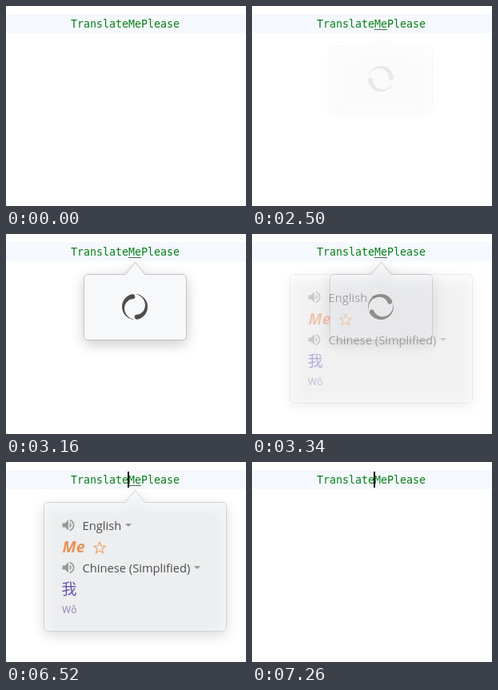
These frames come from a looping animation (300x250 px, 7.76 s). An HTML page with a canvas:

```html
<!DOCTYPE html>
<html lang="en">
<head>
<meta charset="utf-8">
<title>Translation balloon</title>
<style>
  html, body { margin: 0; width: 300px; height: 250px; overflow: hidden; background: #fff; }
  canvas { display: block; width: 300px; height: 250px; }
</style>
</head>
<body>
<canvas id="stage" width="300" height="250"></canvas>
<script>
const LOOP = 7760, STEP = 60;
const ctx = document.getElementById('stage').getContext('2d');

const UI = '"Open Sans", "Noto Sans", sans-serif';
const MONO = '13.29px "DejaVu Sans Mono", monospace';
const GREY = '#6e6e6e';

const CARET_ON = [[500, 1000], [1500, 2000], [6520, 6760], [7260, LOOP]];
const FADE_IN = [0.1, 0.3, 0.55, 0.8, 1];
const SWAP_OUT = [0.95, 0.85, 0.6, 0.3, 0];
const FADE_OUT = [0.68, 0.48, 0.28, 0.1, 0];

const LOADING = { x: 97.5, y: 50.5, w: 128, h: 82 };
const RESULT = { x: 47.5, y: 50.5, w: 228, h: 161 };

const SPEAKER = new Path2D(
  'M3 9v6h4l5 5V4L7 9H3z' +
  'm13.5 3c0-1.77-1.02-3.29-2.5-4.03v8.05c1.48-.73 2.5-2.25 2.5-4.02z' +
  'M14 3.23v2.06c2.89.86 5 3.54 5 6.71s-2.11 5.85-5 6.71v2.06' +
  'c4.01-.91 7-4.49 7-8.77s-2.99-7.86-7-8.77z');

const within = (t, [from, to]) => t >= from && t < to;

function level(t, start, steps) {
  const i = Math.floor((t - start) / STEP);
  return steps[Math.min(i, steps.length - 1)];
}

function text(str, x, y, font, color) {
  ctx.font = font;
  ctx.fillStyle = color;
  ctx.fillText(str, x, y);
}

// Rounded box with a pointer at the top
function balloonPath({ x, y, w, h }, dx = 0) {
  const r = 5, tip = 161.5 + dx, l = x + dx, right = l + w, bottom = y + h;
  ctx.beginPath();
  ctx.moveTo(l + r, y);
  ctx.lineTo(tip - 12, y);
  ctx.lineTo(tip, 35);
  ctx.lineTo(tip + 12, y);
  ctx.arcTo(right, y, right, bottom, r);
  ctx.arcTo(right, bottom, l, bottom, r);
  ctx.arcTo(l, bottom, l, y, r);
  ctx.arcTo(l, y, right, y, r);
  ctx.closePath();
}

function balloon(box, alpha, content) {
  if (alpha <= 0) return;
  ctx.save();
  ctx.globalAlpha = alpha;

  // Cast only the shadow: the shape itself lies off stage
  ctx.save();
  ctx.shadowColor = 'rgba(0, 0, 0, 0.22)';
  ctx.shadowBlur = 17;
  ctx.shadowOffsetX = 1000;
  ctx.shadowOffsetY = 5;
  ctx.fillStyle = '#000';
  balloonPath(box, -1000);
  ctx.fill();
  ctx.restore();

  balloonPath(box);
  ctx.fillStyle = '#f7f8fa';
  ctx.fill();
  ctx.strokeStyle = '#c0c3c8';
  ctx.lineWidth = 1;
  ctx.stroke();
  content();
  ctx.restore();
}

// Arc that swells from a thin tail to a round head at angle 0
function comma() {
  const R = 16, thick = 6, sweep = 2.95, n = 30;
  ctx.beginPath();
  ctx.arc(0, 0, R, -sweep, 0);
  ctx.arc(R - thick / 2, 0, thick / 2, 0, Math.PI);
  for (let i = n; i >= 0; i--) {
    const k = i / n, a = (k - 1) * sweep, r = R - thick * k;
    ctx.lineTo(r * Math.cos(a), r * Math.sin(a));
  }
  ctx.fill();
}

function spinner(t) {
  const turns = Math.floor((t - 2500) / STEP);
  ctx.save();
  ctx.translate(161, 91);
  ctx.rotate((24 * turns - 6) * Math.PI / 180);
  ctx.fillStyle = '#4d4d4d';
  comma();
  ctx.rotate(Math.PI);
  comma();
  ctx.restore();
}

function star(cx, cy) {
  ctx.beginPath();
  for (let i = 0; i < 10; i++) {
    const a = i * Math.PI / 5 - Math.PI / 2, r = i % 2 ? 3.3 : 7.8;
    ctx.lineTo(cx + r * Math.cos(a), cy + r * Math.sin(a));
  }
  ctx.closePath();
  ctx.strokeStyle = '#ea8732';
  ctx.lineWidth = 1.2;
  ctx.lineJoin = 'round';
  ctx.stroke();
}

function languageRow(name, y, arrowX) {
  ctx.save();
  ctx.translate(68, y - 10);
  ctx.scale(0.83, 0.83);
  ctx.fillStyle = GREY;
  ctx.fill(SPEAKER);
  ctx.restore();

  text(name, 95.5, y + 6, '14.7px ' + UI, '#000');

  ctx.fillStyle = GREY;
  ctx.beginPath();
  ctx.moveTo(arrowX - 4, y - 2);
  ctx.lineTo(arrowX + 4, y - 2);
  ctx.lineTo(arrowX, y + 2);
  ctx.fill();
}

function result() {
  languageRow('English', 79, 153);
  text('Me', 70.5, 113, 'italic bold 19.5px ' + UI, '#e5650f');
  star(117, 107.5);
  languageRow('Chinese (Simplified)', 132, 239);
  text('我', 69.5, 166, '19px "Noto Sans CJK SC", "Noto Sans CJK", sans-serif', '#260c92');
  text('Wǒ', 70, 188.5, '500 12px "Noto Sans", sans-serif', '#6b4fa8');
}

function draw(t) {
  ctx.fillStyle = '#fff';
  ctx.fillRect(0, 0, 300, 250);
  ctx.fillStyle = '#f5f8fe';
  ctx.fillRect(0, 10, 300, 24);
  text('TranslateMePlease', 81, 27, MONO, '#067d17');

  if (within(t, [2500, 6760])) {
    ctx.fillStyle = '#4a6b50';
    ctx.fillRect(153, 29, 16, 1);
  }
  if (within(t, [2500, 3520])) {
    const alpha = t < 3280 ? level(t, 2500, FADE_IN) : level(t, 3280, SWAP_OUT);
    balloon(LOADING, alpha, () => spinner(t));
  }
  if (within(t, [3280, 6760])) {
    const alpha = t < 6520 ? level(t, 3280, FADE_IN) : level(t, 6520, FADE_OUT);
    balloon(RESULT, alpha, result);
  }
  if (CARET_ON.some(span => within(t, span))) {
    ctx.fillStyle = '#000';
    ctx.fillRect(152, 12, 2, 20);
  }
}

const began = performance.now();
function tick() {
  draw((performance.now() - began) % LOOP);
  requestAnimationFrame(tick);
}
tick();
</script>
</body>
</html>
```
